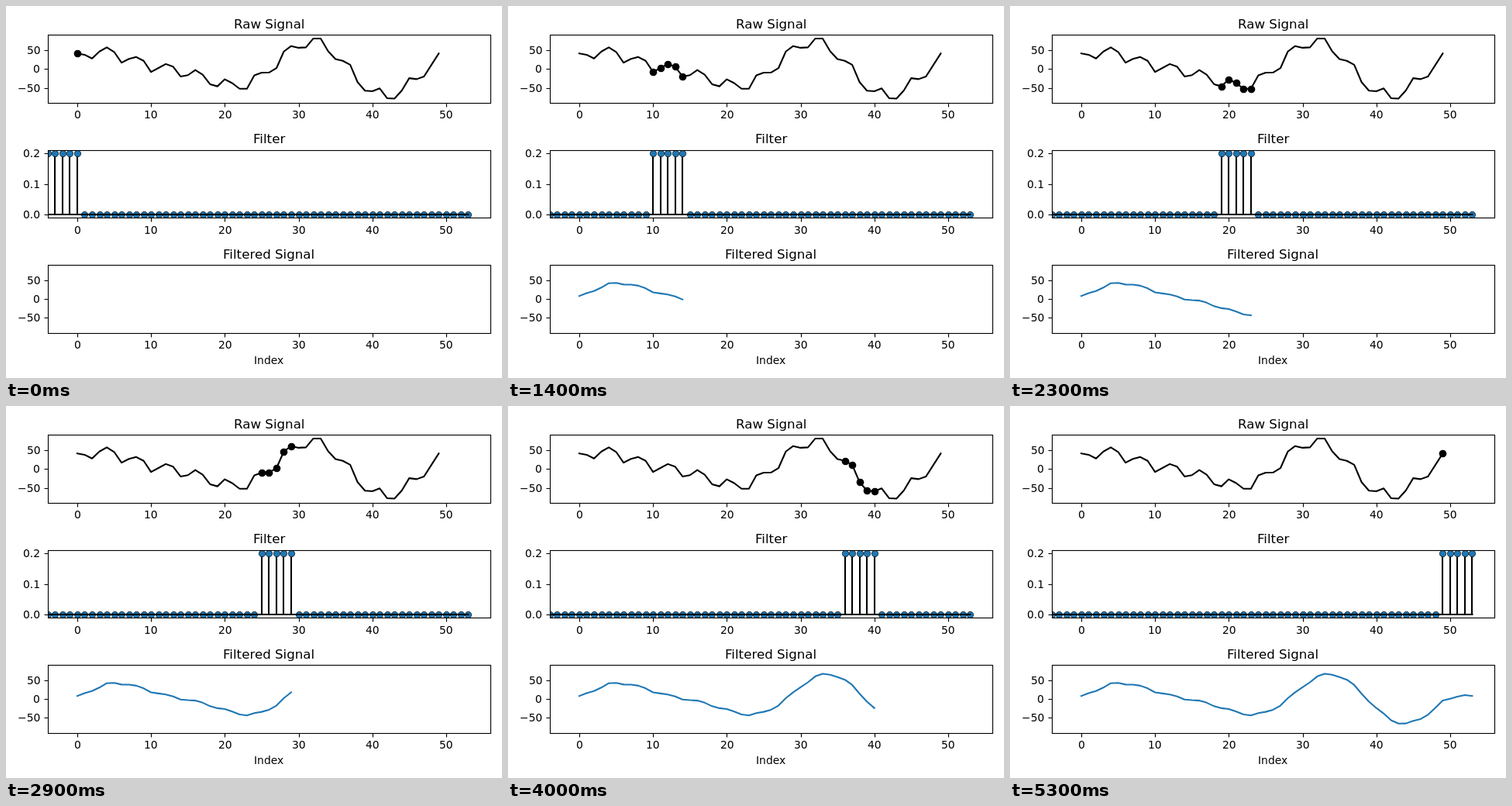
Animation of 640x480 px, one loop 5.4 s. Source, as an HTML page with a canvas:

```html
<!DOCTYPE html>
<html lang="en">
<head>
<meta charset="utf-8">
<title>Moving average filter</title>
<style>
  html, body { margin: 0; width: 100%; height: 100%; overflow: hidden; background: #fff; }
  canvas { display: block; }
</style>
</head>
<body>
<canvas id="stage" width="640" height="480"></canvas>
<script>
const ctx = document.getElementById('stage').getContext('2d');

const STEP_MS = 100, STEPS = 54, TAPS = 5;
const LEFT = 54, RIGHT = 625;
const BLUE = '#1f77b4', BLACK = '#000';
const PT = 100 / 72;
const LINE = 1.5 * PT, THIN = 0.8 * PT;

const raw = [
  41, 37.5, 27.5, 46, 57, 45, 16.5, 26.5, 31.5, 21.5,
  -8, 2.5, 13, 6, -20, -16.5, -3, -15, -40.5, -46,
  -27.5, -37.5, -52.5, -52.5, -17, -10, -9.5, 2, 46, 60.5,
  56, 57, 80.5, 80.5, 47, 26, 21.5, 11, -35, -57.5,
  -59, -51.5, -77.5, -78.5, -57, -24.5, -27, -20, 10.5, 41
];

const filtered = Array.from({ length: STEPS }, (_, i) => {
  let sum = 0;
  for (let j = i - TAPS + 1; j <= i; j++) sum += raw[j] || 0;
  return sum / TAPS;
});

const xAt = i => 53.9 + (i + 4) * 9.518;

const signalTicks = [[50, '50'], [0, '0'], [-50, '\u221250']];
const plots = {
  raw: {
    title: 'Raw Signal', top: 37, bottom: 125, titleY: 29, labelY: 145,
    ticks: signalTicks, y: v => 81.2 - v * 0.4875
  },
  filter: {
    title: 'Filter', top: 186, bottom: 273, titleY: 177, labelY: 294,
    ticks: [[0.2, '0.2'], [0.1, '0.1'], [0, '0.0']], y: v => 269.3 - v * 398
  },
  filtered: {
    title: 'Filtered Signal', top: 334, bottom: 422, titleY: 326, labelY: 442,
    ticks: signalTicks, y: v => 378.1 - v * 0.4875
  }
};

function text(str, x, y, size, align) {
  ctx.font = `${size * PT}px "DejaVu Sans", sans-serif`;
  ctx.fillStyle = BLACK;
  const width = ctx.measureText(str).width;
  ctx.fillText(str, Math.round(x - width * align), y);
}

function polyline(points, color, width, cap = 'butt') {
  ctx.beginPath();
  points.forEach(([x, y], i) => i ? ctx.lineTo(x, y) : ctx.moveTo(x, y));
  ctx.strokeStyle = color;
  ctx.lineWidth = width;
  ctx.lineCap = cap;
  ctx.lineJoin = 'round';
  ctx.stroke();
}

function dot(x, y, fill, edge) {
  ctx.beginPath();
  ctx.arc(Math.round(x) + 0.5, Math.round(y) + 0.5, 3 * PT, 0, Math.PI * 2);
  ctx.fillStyle = fill;
  ctx.fill();
  ctx.strokeStyle = BLACK;
  ctx.lineWidth = edge * PT;
  ctx.stroke();
}

function drawPlot(plot, drawData) {
  const { top, bottom } = plot;
  ctx.save();
  ctx.beginPath();
  ctx.rect(LEFT, top, RIGHT - LEFT + 1, bottom - top + 1);
  ctx.clip();
  drawData(plot.y);
  ctx.restore();

  ctx.strokeStyle = BLACK;
  ctx.lineWidth = THIN;
  ctx.lineJoin = 'miter';
  ctx.strokeRect(LEFT + 0.5, top + 0.5, RIGHT - LEFT, bottom - top);

  for (let i = 0; i <= 50; i += 10) {
    const x = Math.round(xAt(i)) + 0.5;
    polyline([[x, bottom + 0.5], [x, bottom + 5.5]], BLACK, THIN);
    text(String(i), xAt(i), plot.labelY, 10, 0.5);
  }
  for (const [value, label] of plot.ticks) {
    const y = Math.round(plot.y(value));
    polyline([[LEFT - 4.5, y + 0.5], [LEFT + 0.5, y + 0.5]], BLACK, THIN);
    text(label, 44.3, y + 5, 10, 1);
  }
  text(plot.title, 339.5, plot.titleY, 12, 0.5);
}

const curve = (values, y) => values.map((v, i) => [xAt(i), y(v)]);

function draw(step) {
  const inWindow = i => i <= step && i > step - TAPS;
  ctx.fillStyle = '#fff';
  ctx.fillRect(0, 0, 640, 480);

  drawPlot(plots.raw, y => {
    polyline(curve(raw, y), BLACK, LINE, 'square');
    raw.forEach((v, i) => inWindow(i) && dot(xAt(i), y(v), BLACK, 1));
  });

  drawPlot(plots.filter, y => {
    const base = Math.round(y(0)), peak = Math.round(y(0.2));
    for (let i = step - TAPS + 1; i <= step; i++) {
      const x = Math.round(xAt(i));
      polyline([[x, base], [x, peak]], BLACK, LINE);
    }
    for (let i = -4; i < STEPS; i++) {
      dot(xAt(i), y(inWindow(i) ? 0.2 : 0), BLUE, 0.5);
    }
    polyline([[xAt(-4), base], [xAt(STEPS - 1), base]], BLACK, LINE, 'square');
  });

  drawPlot(plots.filtered, y => {
    polyline(curve(filtered.slice(0, step + 1), y), BLUE, LINE, 'square');
  });
  text('Index', 339.5, 462, 10, 0.5);
}

const start = performance.now();
function tick() {
  draw(Math.floor((performance.now() - start) / STEP_MS) % STEPS);
  requestAnimationFrame(tick);
}
tick();
</script>
</body>
</html>
```
